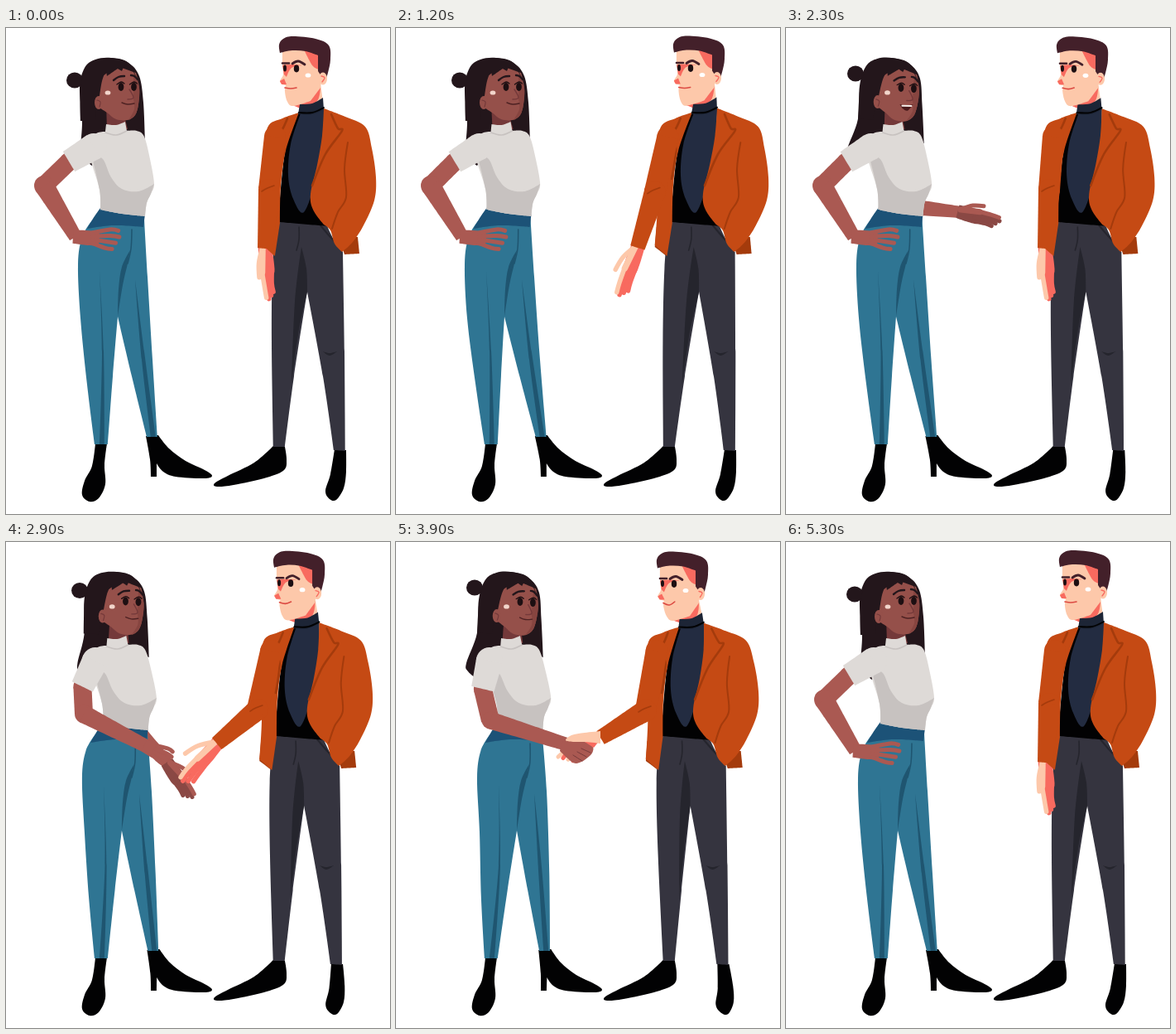
An HTML page with a canvas for the animation above (5.4 s loop, 464 px wide and 586 px high).

```html
<!DOCTYPE html>
<html lang="en">
<head>
<meta charset="utf-8">
<title>Handshake</title>
<style>
html, body { margin: 0; width: 100%; height: 100%; overflow: hidden; background: #fff; }
canvas { display: block; width: 464px; height: 586px; }
</style>
</head>
<body>
<canvas id="stage" width="464" height="586"></canvas>
<script>
const LOOP = 5400, STEP = 100;
const ctx = document.getElementById('stage').getContext('2d');

const C = {
  hair: '#23161b', skin: '#aa5952', face: '#95504a', shade: '#74393a', ink: '#1d0f12',
  shirt: '#dedad7', fold: '#c7c2c0', belt: '#1c5277', jeans: '#2f7593', seam: '#1f5570',
  pale: '#fdc8aa', red: '#f86a5f', brown: '#43202a', navy: '#232c41', black: '#020203',
  coat: '#c54a14', coatDark: '#a43b0c', slacks: '#35343f', slacksDark: '#25252d'
};

// Timing
const ease = (t, a, b) => {
  const u = Math.min(1, Math.max(0, (t - a) / (b - a)));
  return u * u * (3 - 2 * u);
};
const pulse = (t, up, top, down, end) => ease(t, up, top) - ease(t, down, end);
const mix = (a, b, k) => a + (b - a) * k;
const mixPoint = (p, q, k) => [mix(p[0], q[0], k), mix(p[1], q[1], k)];
const chat = (t, from, to) => t >= from && t <= to && t / STEP % 3 !== 0;

function poseAt(t) {
  const talk = pulse(t, 0, 600, 1300, 2000);      // he explains
  const offer = pulse(t, 1750, 2150, 2650, 3200); // she answers with her far hand
  const near = pulse(t, 2500, 3250, 4400, 5250);  // she steps closer
  const lean = pulse(t, 2600, 3300, 4250, 5050);  // he leans in
  const clasp = t >= 3100 && t < 4300;
  return {
    t, offer, clasp,
    reach: pulse(t, 2550, 3100, 4350, 4900),
    grip: Math.max(.32 * talk, pulse(t, 2350, 3050, 4250, 4940)),
    drop: pulse(t, 4200, 4500, 4600, 5250),
    bob: clasp ? 5 * Math.sin((t - 3300) / 200 * Math.PI) : 0,
    head: 10 * near - 6 * talk - offer,
    neck: 6 * near - 5.5 * talk - 3.5 * offer,
    hip: 11 * near - 4 * talk - 2 * offer,
    lift: Math.max(offer, near),
    lean: 5 * talk - 3 * offer * (1 - lean) - 15 * lean
  };
}

// Point maps
const same = (x, y) => [x, y];
const turn = (cx, cy, a, flip = 1) => (x, y) => [
  cx + x * Math.cos(a) - y * flip * Math.sin(a), cy + x * Math.sin(a) + y * flip * Math.cos(a)
];
function ramp(y, ...stops) {
  let i = 1;
  while (i < stops.length - 1 && stops[i][0] < y) i++;
  const [y0, a] = stops[i - 1], [y1, b] = stops[i];
  return mix(a, b, Math.min(1, Math.max(0, (y - y0) / (y1 - y0))));
}

// Smooth curve through "x,y" points; a trailing ! makes a corner
function curve(text, map, open) {
  const pts = text.trim().split(/\s+/).map((s, i, all) => {
    const p = map(...s.split(',').map(parseFloat));
    return { x: p[0], y: p[1], sharp: s.endsWith('!') || open && (i === 0 || i === all.length - 1) };
  });
  const n = pts.length, at = i => pts[(i + n) % n];
  const handle = (i, sign) => {
    const p = at(i), k = p.sharp ? 0 : sign / 6;
    return [p.x + (at(i + 1).x - at(i - 1).x) * k, p.y + (at(i + 1).y - at(i - 1).y) * k];
  };
  ctx.beginPath();
  ctx.moveTo(pts[0].x, pts[0].y);
  for (let i = 0; i < (open ? n - 1 : n); i++)
    ctx.bezierCurveTo(...handle(i, 1), ...handle(i + 1, -1), at(i + 1).x, at(i + 1).y);
}
function fill(text, color, map = same) {
  ctx.fillStyle = color;
  curve(text, map);
  ctx.fill();
}
function line(text, color, width, map = same) {
  ctx.strokeStyle = color;
  ctx.lineWidth = width;
  curve(text, map, true);
  ctx.stroke();
}
function dot(x, y, rx, ry, color, map = same) {
  ctx.fillStyle = color;
  ctx.beginPath();
  ctx.ellipse(...map(x, y), rx, ry, 0, 0, 7);
  ctx.fill();
}
function limb(a, b, ra, rb, color) {
  const map = turn(...a, Math.atan2(b[1] - a[1], b[0] - a[0]));
  const len = Math.hypot(b[0] - a[0], b[1] - a[1]);
  dot(...a, ra, ra, color);
  fill(`0,${-ra}! ${len},${-rb}! ${len},${rb}! 0,${ra}!`, color, map);
}

// Palm with four fanned fingers and an optional thumb tip
function hand([x, y], angle, { len, spread, width = 5, flip = 1, thumb, color, palm = color }) {
  const map = turn(x, y, angle * Math.PI / 180, flip), mid = len * .46;
  fill(`-3,-8! ${mid},-8 ${mid + 4},0 ${mid},9 -3,8!`, palm, map);
  for (let i = 3; i >= 0; i--) {
    const side = i - 1.5, tip = len - 4 * Math.abs(i - .7);
    line(`${mid - 4},${side * 4.2} ${tip * .8},${side * spread} ${tip},${side * spread + 1}`, i ? palm : color, width, map);
  }
  if (thumb) {
    line(`1,-4 ${thumb[0] * .5},${thumb[1] * .6 - 3} ${thumb}`, color, width, map);
    line(`0,-3 ${mid},-6`, color, width + 2, map);
  }
}

function drawWoman(p) {
  const foot = p.hip * .28;
  const body = (x, y) => [x + ramp(y, [115, p.neck], [230, mix(p.neck, p.hip, .7)], [270, p.hip], [350, p.hip],
    [495, x > 136 ? foot : 0], [530, 0]), y];
  const tilt = turn(125 + p.head, 85, .07 * p.lift);
  const head = (x, y) => tilt(x - 125, y - 85);
  // Hair follows the head at the top and swings freely below
  const hair = (x, y) => {
    const k = ease(y, 100, 145), [hx, hy] = head(x, y);
    return [mix(hx, x + p.head - (x < 120 ? 15 * p.lift : 0), k), mix(hy, y, k)];
  };
  fill('108,38 127,36 148,42 161,58 166,90 168,139! 140,126! 104,166! 92,156 90,146 92,112 89,72 95,48', C.hair, hair);
  dot(83 + p.head + 2 * p.lift, 63 - 8 * p.lift, 10, 9.5, C.hair);

  const swing = 95 * (1 - p.offer), rad = swing * Math.PI / 180;
  const farElbow = [154 + 12 * p.offer + p.hip * .8 + 20 * p.drop, 217 + 26 * Math.sin(rad)];
  const farWrist = turn(...farElbow, rad)(46, 5);
  limb(farElbow, farWrist, 9, 7, C.skin);
  hand(farWrist, swing + 14, { len: 50, spread: 4, thumb: [26, -14], color: C.skin, palm: '#8a4844' });

  fill('108,501! 122,501! 119,527 120,550 112,567 101,571 92,563 95,546 104,528', C.black, body);
  fill('169,492! 184,491! 197,507 217,522 240,533 249,540 239,543 205,541 190,535 182,525! 182,541! 175,541! 174,520', C.black, body);
  fill(`104,232! 92,252 87,285 90,350 98,430 107,502! 123,502! 129,420 135,348! 152,420 170,493! 183,493!
    177,400 171,300 167,230!`, C.jeans, body);
  fill('150,268! 140,288 136,315 135,348! 141,310 147,284', C.seam, body);
  line('152,243 151,266 147,284', C.seam, 1.5, body);
  fill('113,292! 116,390 113,502! 119,502! 118,390', C.seam, body);
  fill('156,303! 164,400 175,493! 181,493! 167,390', C.seam, body);
  fill('114,217! 168,225! 166,240! 130,238 98,242! 105,230', C.belt, body);

  fill('121,88! 122,124! 147,122! 143,106!', C.shade, (x, y) => y < 110 ? head(x, y) : body(x, y));
  fill(`121,116! 133,117 144,113! 146,124! 158,124 167,131 174,158 179,188 175,200 170,211 168,227!
    140,224 114,219! 113,195 104,165 99,145 108,128 120,125!`, C.shirt, body);
  fill('103,152! 117,158 127,180 140,194 160,197 179,188! 175,200 170,211 168,227! 140,224 114,219! 113,195', C.fold, body);
  line('120,126 133,129 146,124', C.fold, 1.5, body);

  // Near arm moves from the hip to the handshake
  const shoulder = body(106, 143), rest = p.hip * (1 - p.reach);
  const elbow = mixPoint([46 + rest, 190], [114, 215], p.reach);
  const wrist = mixPoint([84 + rest, 252], [206, 244 + p.bob], p.reach);
  const aim = Math.atan2(elbow[1] - shoulder[1], elbow[0] - shoulder[0] - 18);
  const cuff = turn(...shoulder, aim)(35, 0);
  limb(cuff, elbow, 11, 11, C.skin);
  limb(elbow, wrist, mix(12, 10.5, p.reach), 8, C.skin);
  if (!p.clasp) {
    const onHip = p.reach < .3;
    hand(wrist, onHip ? 3 : 26, { len: onHip ? 54 : 34, spread: onHip ? 7.5 : 6, color: C.skin });
  }
  limb(shoulder, cuff, 16, 14, C.shirt);
  drawWomanFace(p, head);
}

function drawWomanFace(p, head) {
  fill('114,60! 134,46! 157,54! 161,72 160,92 156,105 147,111 133,110 122,102 111,95!', C.face, head);
  fill('154,55! 161,72 160,92 156,105 148,111! 155,98 154,86!', '#874540', head);
  fill(`90,112! 90,72 98,47 110,39 127,36 148,42 161,68! 154,53! 143,45! 140,52! 135,49!
    122,58! 121,51! 116,64 113,82! 107,89 109,98! 108,112!`, C.hair, head);
  dot(112, 90, 5, 8, C.face, head);
  line('110,87 114,89 113,95', C.shade, 1.2, head);
  for (const x of [139, 154.5]) {
    dot(x, 71, 3.4, 5, C.ink, head);
    line(`${x - 5},68 ${x},65 ${x + 4},67`, C.ink, 1.3, head);
  }
  line('130,63 136,59 143,58', C.hair, 2.4, head);
  line('151,57 155,58 159,62', C.hair, 2.4, head);
  line('149,74 154,84 147,86', C.shade, 1.4, head);
  dot(123, 78, 3.4, 2.6, '#f2d5cb', head);
  if (chat(p.t, 1900, 2500)) {
    fill('139,91! 147,92 155,90! 149,98 143,96', '#4a1a1c', head);
    line('142,92.5 153,92', '#f4ece8', 2, head);
  } else {
    line('140,90 147,92 155,91', '#4e2223', 1.4, head);
  }
}

function drawMan(p) {
  const foot = Math.min(p.lean, 0) * .58;
  const body = (x, y) => [
    x + ramp(y, [60, p.lean], [98, p.lean * .8], [150, p.lean * .62], [260, p.lean * .55],
      [508, x > 360 ? foot : 0], [570, x > 360 ? -foot * .3 : 0]),
    y - ramp(y, [80, p.lean * .1], [115, 0])
  ];

  fill('323,504! 337,505! 339,520 336,533 315,542 275,551 255,553 252,549 268,540 300,524', C.black, body);
  fill('397,508! 411,509! 411,535 408,555 399,569 391,568 386,558 392,538', C.black, body);
  fill('312,240! 330,234! 327,277! 310,264!', C.coatDark, body);
  fill('402,252! 425,252! 427,272! 409,273!', C.coatDark, body);
  fill('327,232! 386,234! 396,255 407,270! 409,390 410,510! 396,509! 383,420 364,318! 348,420 337,505! 323,505! 321,380 322,290',
    C.slacks, body);
  fill('357,264! 363,290 364,318! 353,370 345,430! 349,330', C.slacksDark, body);
  line('354,240 354,255 351,268', C.slacksDark, 1.6, body);
  line('380,238 392,252 406,266', C.slacksDark, 2, body);
  fill('383,390! 391,392 400,390! 391,395', C.slacksDark, body);

  fill('353,102! 337,150 329,234! 390,239! 376,190! 384,97!', C.black, body);
  fill('356,103! 384,97! 383,135 375,180 360,222 347,206 341,178 344,140', C.navy, body);

  const k = p.grip, open = Math.min(1, 1.7 * k);
  const elbow = mixPoint([318, 195], [302, 203], k);
  const wrist = mixPoint([313, 266], [247, 236 + p.bob], k);
  wrist[1] += 10 * Math.sin(Math.PI * k);
  if (!p.clasp) hand(wrist, 85 + 46 * open, {
    len: 62, spread: 3 + 2 * open, width: 5.5, flip: -1, thumb: [34, -10 - 11 * open], color: C.pale, palm: C.red
  });

  fill('354,102! 334,109 316,120 312,160 313,215 310,262! 325,275! 331,235! 332,190 338,148', C.coat, body);
  fill(`384,97! 410,107 434,119 442,145 447,180 445,208 432,238 419,258 406,270! 397,260 392,244 384,237!
    371,219 368,200 376,165 382,130`, C.coat, body);
  line('340,109 334,122 328,127 335,146 330,182', C.coatDark, 2.6, body);
  line('393,104 401,121 406,124 386,152 370,190', C.coatDark, 2.6, body);
  line('413,138 409,170 411,204 401,222 394,242', C.coatDark, 2, body);

  limb(body(325, 131), elbow, 13, 13, C.coat);
  limb(elbow, wrist, 13, 9, C.coat);
  line('-9,2 -2,-2 6,-5', C.coatDark, 1.6, turn(...elbow, 0));
  drawManHead(p, body);
}

function drawManHead(p, body) {
  fill('353,86! 380,66! 383,90! 356,98!', C.pale, body);
  fill('346,93! 368,85 380,70! 376,88 356,97!', C.red, body);
  fill('355,92! 370,91 383,84! 384,98! 370,104 353,104!', '#1d2536', body);
  line('354,102 370,102 384,96', C.black, 2, body);
  fill('334,24! 334,42 335,56 331,64 334,68 338,69! 337,77 340,89 347,94 368,88! 380,72! 384,40! 374,22!', C.pale, body);
  fill('360,26! 379,28! 378,50! 370,45', C.red, body);
  fill('334,45! 345,44 358,45! 345,48 339,59! 336,56!', C.red, body);
  fill('331,64! 336,61! 339,68! 333,68!', C.red, body);
  fill('331,30! 330,20 335,13 347,10 374,13 390,21 392,38 389,54 385,66! 381,58! 377,52! 377,33! 362,28 346,27', C.brown, body);
  dot(383, 61, 5, 7.5, C.pale, body);
  line('381,58 385,60 382,65', C.red, 1.3, body);
  line('334,42.5 342,42.5', C.brown, 2.6, body);
  line('346,43 353,40 361,44', C.brown, 2.8, body);
  dot(337, 48.5, 2, 4, C.ink, body);
  dot(351, 49, 3.2, 4.4, C.ink, body);
  dot(365, 57, 3.4, 2.6, '#fff', body);
  if (chat(p.t, 300, 1700)) {
    fill('337,71! 344,72 350,71! 343,76', '#8f2a2a', body);
  } else {
    const smile = Math.max(0, -p.lean / 10);
    line(`337,72 344,${73 + smile} 351,${72 - smile}`, '#dc4a42', 1.6, body);
  }
}

function drawClasp(p) {
  const at = turn(0, p.bob, 0);
  for (let i = 0; i < 4; i++) line(`${206 + i * 4},250 ${196 + i * 6},${259 + i * 1.6}`, i % 2 ? C.red : C.pale, 5, at);
  fill('203,236! 225,240 237,246 238,252 234,258 224,265 214,266 198,252!', C.skin, at);
  for (let i = 0; i < 3; i++) line(`${224 - i * 5},${249 + i * 4} ${235 - i * 5},${254 + i * 5}`, C.shade, 1, at);
  fill('228,241! 247,238! 239,248!', C.red, at);
  fill('247,228! 228,230 212,233 205,239 214,241 229,241 247,243!', C.pale, at);
}

const start = performance.now();
function frame() {
  const p = poseAt(Math.floor((performance.now() - start) % LOOP / STEP) * STEP);
  ctx.fillStyle = '#fff';
  ctx.fillRect(0, 0, 464, 586);
  ctx.lineCap = ctx.lineJoin = 'round';
  drawWoman(p);
  drawMan(p);
  if (p.clasp) drawClasp(p);
  requestAnimationFrame(frame);
}
frame();
</script>
</body>
</html>
```
